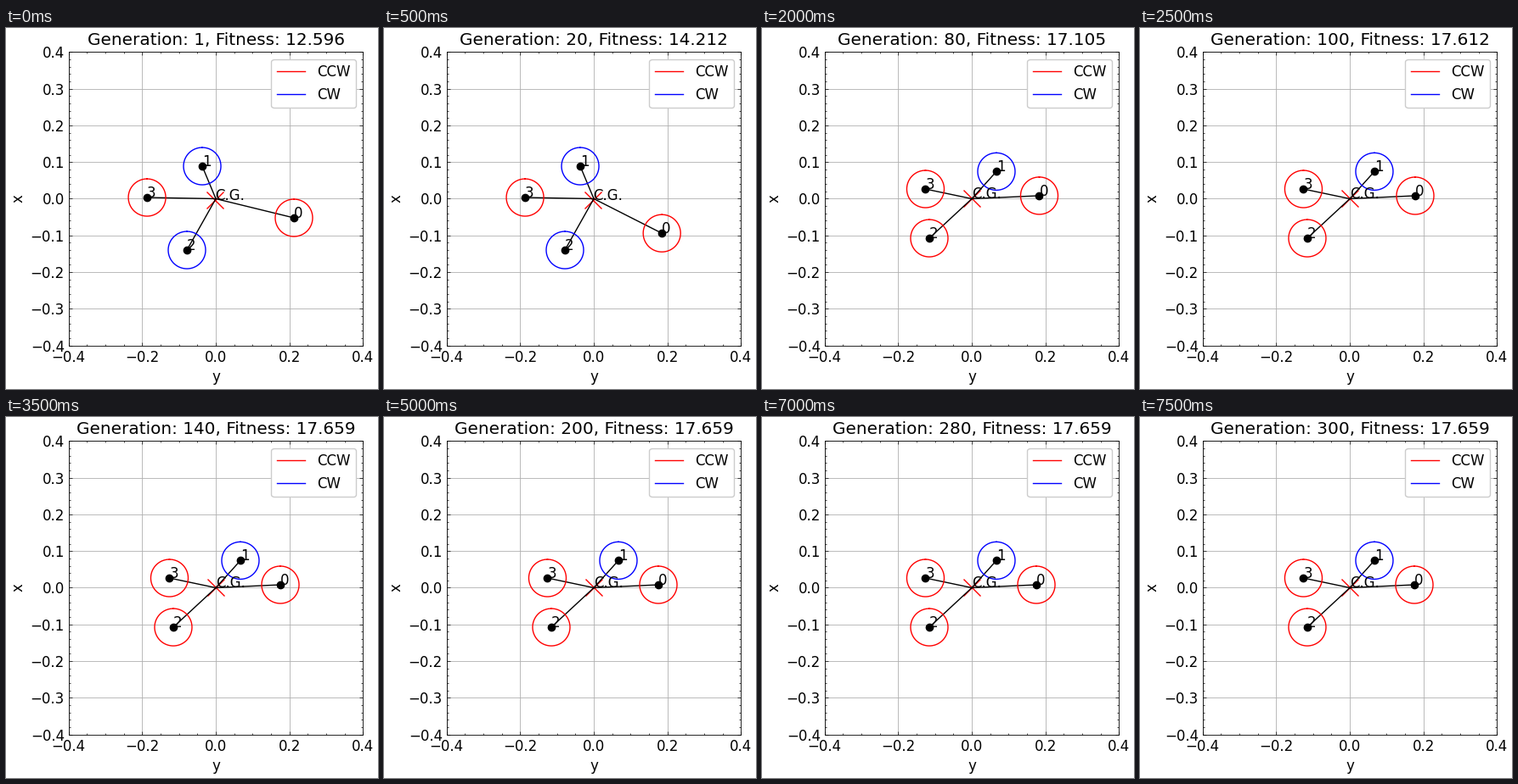
Recreate the animation shown at these times as a matplotlib script. Size 438 px wide and 426 px high, loop 8 s.

```python
import numpy as np
import matplotlib.pyplot as plt
from matplotlib.animation import FuncAnimation

W, H, DPI = 438, 426, 100
LEFT, BOTTOM, SIDE = 73.8, 51.25, 346.5
RADIUS = 0.0508

plt.rcParams.update({
    "font.family": "DejaVu Sans",
    "font.size": 12,
    "lines.linewidth": 1.0,
    "axes.linewidth": 0.6,
    "grid.linewidth": 0.6,
    "grid.color": "#b0b0b0",
    "legend.framealpha": 1.0,
})
for k in ("xtick", "ytick"):
    plt.rcParams.update({
        f"{k}.direction": "in",
        f"{k}.minor.visible": True,
        f"{k}.major.size": 3,
        f"{k}.minor.size": 1.5,
        f"{k}.major.width": 0.5,
        f"{k}.minor.width": 0.5,
    })
plt.rcParams.update({"xtick.top": True, "ytick.right": True})

# Rotor layouts: four (y, x) positions, then the spin of each rotor
EARLY = [(0.2123, -0.0520), (-0.0370, 0.0888), (-0.0786, -0.1398), (-0.1870, 0.0034)]
LATE = [(0.1892, 0.0085), (0.0668, 0.0742), (-0.1156, -0.1075), (-0.1260, 0.0265)]
EARLY_SPIN, LATE_SPIN = "rbbr", "rbrr"
EARLY_CG, LATE_CG = (-0.0020, -0.0040), (0.0008, 0.0)


def with_first(layout, y, x):
    return [(y, x)] + layout[1:]


# (first generation, fitness, layout, spins, centre of gravity)
STAGES = [
    (1, 12.596, EARLY, EARLY_SPIN, EARLY_CG),
    (20, 14.212, with_first(EARLY, 0.185, -0.094), EARLY_SPIN, EARLY_CG),
    (40, 16.573, LATE, LATE_SPIN, LATE_CG),
    (80, 17.105, with_first(LATE, 0.1834, 0.0083), LATE_SPIN, LATE_CG),
    (100, 17.612, with_first(LATE, 0.1777, 0.0082), LATE_SPIN, LATE_CG),
    (120, 17.615, with_first(LATE, 0.1777, 0.0082), LATE_SPIN, LATE_CG),
    (140, 17.659, with_first(LATE, 0.1754, 0.0081), LATE_SPIN, LATE_CG),
]

fig = plt.figure(figsize=(W / DPI, H / DPI), dpi=DPI, facecolor="white")
ax = fig.add_axes([LEFT / W, BOTTOM / H, SIDE / W, SIDE / H])
ax.set(xlim=(-0.4, 0.4), ylim=(-0.4, 0.4), xlabel="y", ylabel="x")
ax.set_xticks(np.linspace(-0.4, 0.4, 5))
ax.set_yticks(np.linspace(-0.4, 0.4, 9))
ax.grid(True)

ax.plot([], [], "r", label="CCW")
ax.plot([], [], "b", label="CW")
ax.legend(loc="upper right")

title = ax.set_title("")
cross, = ax.plot([], [], "rx", markersize=14)
cg_text = ax.text(0, 0, "C.G.")
arms = [ax.plot([], [], "k-")[0] for _ in range(4)]
hubs = [ax.plot([], [], "ko")[0] for _ in range(4)]
discs = [ax.plot([], [])[0] for _ in range(4)]
tags = [ax.text(0, 0, str(i)) for i in range(4)]

angle = np.linspace(0, 2 * np.pi, 100)
ring_y, ring_x = RADIUS * np.sin(angle), RADIUS * np.cos(angle)


def update(i):
    gen = max(1, 20 * i)
    _, fitness, layout, spins, cg = [s for s in STAGES if s[0] <= gen][-1]
    title.set_text(f"Generation: {gen}, Fitness: {fitness:.3f}")
    cross.set_data([cg[0]], [cg[1]])
    cg_text.set_position(cg)
    for (y, x), spin, arm, hub, disc, tag in zip(layout, spins, arms, hubs, discs, tags):
        arm.set_data([0, y], [0, x])
        hub.set_data([y], [x])
        disc.set_data(y + ring_y, x + ring_x)
        disc.set_color(spin)
        tag.set_position((y, x))
    return [title, cross, cg_text, *arms, *hubs, *discs, *tags]


anim = FuncAnimation(fig, update, frames=16, interval=500, repeat=True, repeat_delay=0)
plt.show()
```
